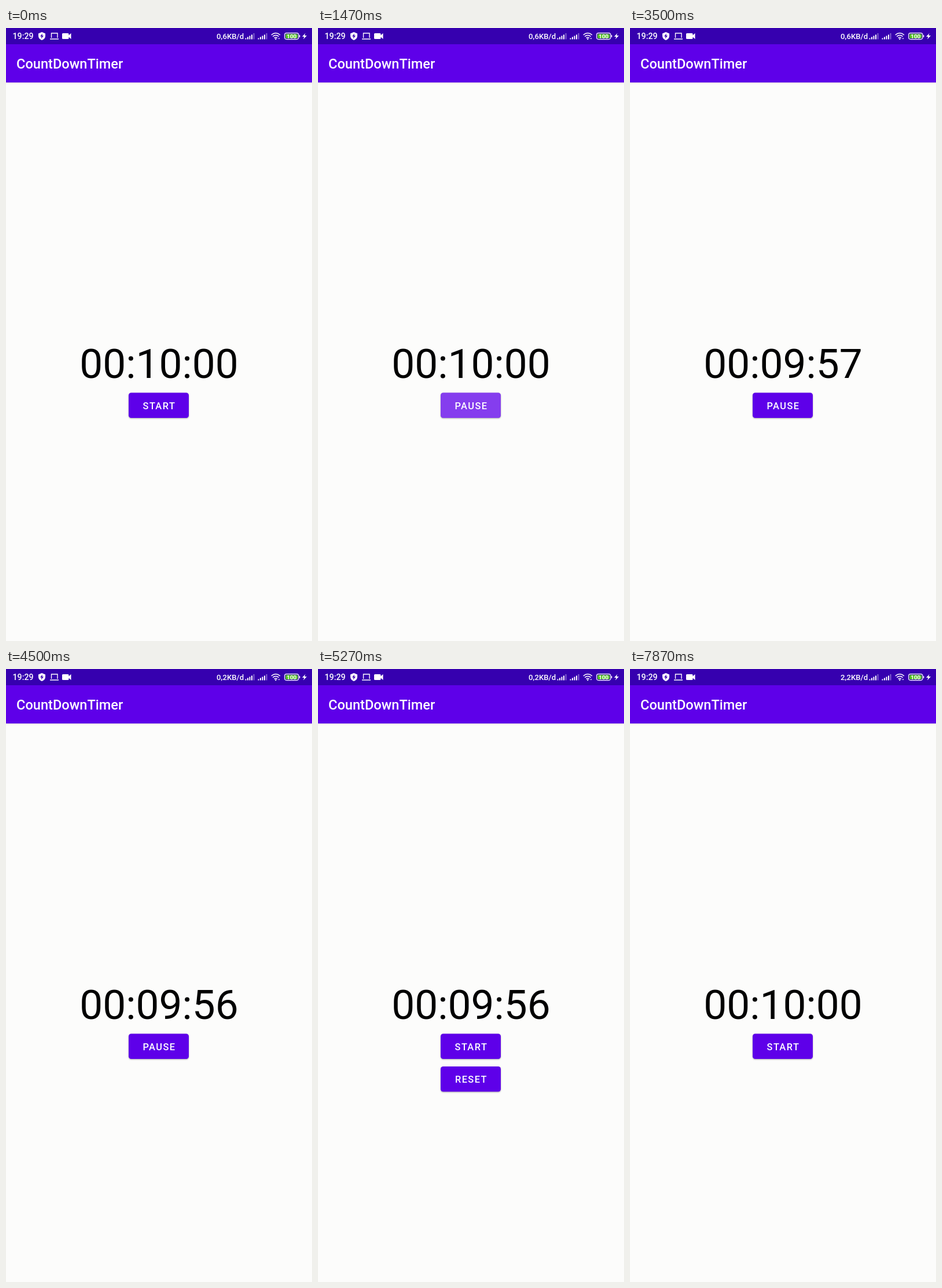
Animation of 529 by 1058 pixels, one loop 8 s. Source, as an HTML page:

```html
<!DOCTYPE html>
<html lang="en">
<head>
<meta charset="utf-8">
<title>CountDownTimer</title>
<style>
  html, body { margin: 0; width: 100%; height: 100%; overflow: hidden; background: #fcfcfb; }
  svg { display: block; width: 529px; height: 1058px; font-family: Roboto, sans-serif; font-weight: 500; fill: #fff; }
  .line { fill: none; stroke: #fff; }
  .label { font-size: 16.4px; letter-spacing: 1.45px; text-anchor: middle; }
  #clock { font-size: 71.2px; font-weight: 400; fill: #000; text-anchor: middle; }
  #bar { filter: drop-shadow(0 1px 1px rgba(0, 0, 0, .12)); }
</style>
</head>
<body>
<svg viewBox="0 0 529 1058">
  <defs>
    <clipPath id="shape"><rect x="212" y="629.5" width="104" height="43.5" rx="4.5"/></clipPath>
    <g id="signal">
      <path d="M0 17.5h2v2h-2zM3.5 15.5h2v4h-2zM7 13.5h2v6h-2zM10.5 11.5h2v8h-2z"/>
      <path d="M14 9h2v10.5h-2z" opacity=".4"/>
    </g>
  </defs>

  <rect id="bar" y="28" width="529" height="66" fill="#5e00e9"/>
  <rect width="529" height="28" fill="#3600af"/>
  <text x="18" y="70" font-size="23.6">CountDownTimer</text>

  <text x="11.5" y="19" font-size="14.2">19:29</text>
  <path d="M62 7l6 2.4v4.2c0 3.6-2.5 6.3-6 7.4c-3.500-1.100-6-3.800-6-7.400v-4.200z"/>
  <path d="M63 9.500l-4 5h2.500l-.7 4l4.200-5.300h-2.500z" fill="#3600af"/>
  <path class="line" d="M78.500 17v-8h10.500v8M76 19h15" stroke-width="1.400"/>
  <path d="M98.500 9h8.500q1.500 0 1.500 1.500v2l4-3.500v10l-4-3.500v2q0 1.500-1.500 1.500h-8.500q-1.500 0-1.500-1.500v-7q0-1.500 1.500-1.500z"/>
  <text id="speed" x="364" y="19" font-size="13.2"></text>
  <use href="#signal" x="413.500"/>
  <use href="#signal" x="435.500"/>
  <path class="line" d="M458.700 12q7.500-6.500 15.200 0M461.200 14.700q5.200-4.400 10.300 0M463.700 17.300q2.600-2 5.200 0" stroke-width="1.600"/>
  <circle cx="466.300" cy="19" r="1.200"/>
  <path d="M470.500 19l1.500-2.500l1.500 2.500z" opacity=".8"/>
  <rect class="line" x="481.600" y="8.600" width="24.300" height="11" rx="3.500" stroke-width="1.200"/>
  <rect x="483.200" y="10.200" width="21.100" height="7.800" rx="2" fill="#54c424"/>
  <rect x="506.800" y="12" width="1.500" height="4" rx=".7"/>
  <text x="493.800" y="17.700" font-size="9.800" font-weight="700" text-anchor="middle">100</text>
  <path d="M517.500 9l-5.500 6h3.500l-1.500 4.500l6-6.500h-3.700z"/>

  <text id="clock" x="264.500" y="604"></text>
  <g id="main"></g>
  <g id="reset" transform="translate(0 56.500)"></g>
</svg>
<script>
const $ = id => document.getElementById(id);
const ramp = (t, from, to) => Math.min(1, Math.max(0, (t - from) / (to - from)));

function makeButton(id, text) {
  $(id).innerHTML = `
    <rect x="212" y="629.5" width="104" height="43.5" rx="4.5" fill="#5e00e9"/>
    <g clip-path="url(#shape)"><circle cx="264" cy="651"/></g>
    <text class="label" x="265" y="657.5">${text}</text>`;
  const [box, ripple, label] = ['rect', 'circle', 'text'].map(s => $(id).querySelector(s));
  return {
    label,
    // size and glow drive the ripple, lift the shadow; all 0..1
    press(size, glow, lift) {
      ripple.setAttribute('r', 8 + 50 * size);
      ripple.setAttribute('opacity', 0.24 * glow);
      box.style.filter =
        `drop-shadow(0 ${1.3 + 3.5 * lift}px ${1 + 3 * lift}px rgba(0,0,0,.32))`;
    }
  };
}

const main = makeButton('main', 'START');
const reset = makeButton('reset', 'RESET');

const START = 1470, HOLD = 4770, PAUSE = 5000, RESET = 5730, CLEARED = 5830;

function clockText(t) {
  if (t < 1500 || t >= CLEARED) return '00:10:00';
  return '00:09:' + (59 - Math.min(3, Math.floor((t - 1500) / 1000)));
}

function draw(t) {
  $('clock').textContent = clockText(t);
  $('speed').textContent = (t < 3870 ? '0,6' : t < 7830 ? '0,2' : '2,2') + 'KB/d';
  main.label.textContent = t >= START && t < PAUSE ? 'PAUSE' : 'START';

  if (t < HOLD) {
    main.press(1, t < START ? 0 : 1 - ramp(t, START + 30, 1730), 0);
  } else {
    main.press(
      ramp(t, HOLD, PAUSE),
      ramp(t, HOLD, HOLD + 75) * (1 - ramp(t, PAUSE, 5270)),
      ramp(t, HOLD, HOLD + 100) * (1 - ramp(t, PAUSE, PAUSE + 100)));
  }

  $('reset').style.display = t >= PAUSE && t < CLEARED ? '' : 'none';
  reset.press(ramp(t, RESET, RESET + 225), ramp(t, RESET, RESET + 75), ramp(t, RESET, RESET + 100));
}

function loop() {
  draw(performance.now() % 8000);
  requestAnimationFrame(loop);
}
loop();
</script>
</body>
</html>
```
